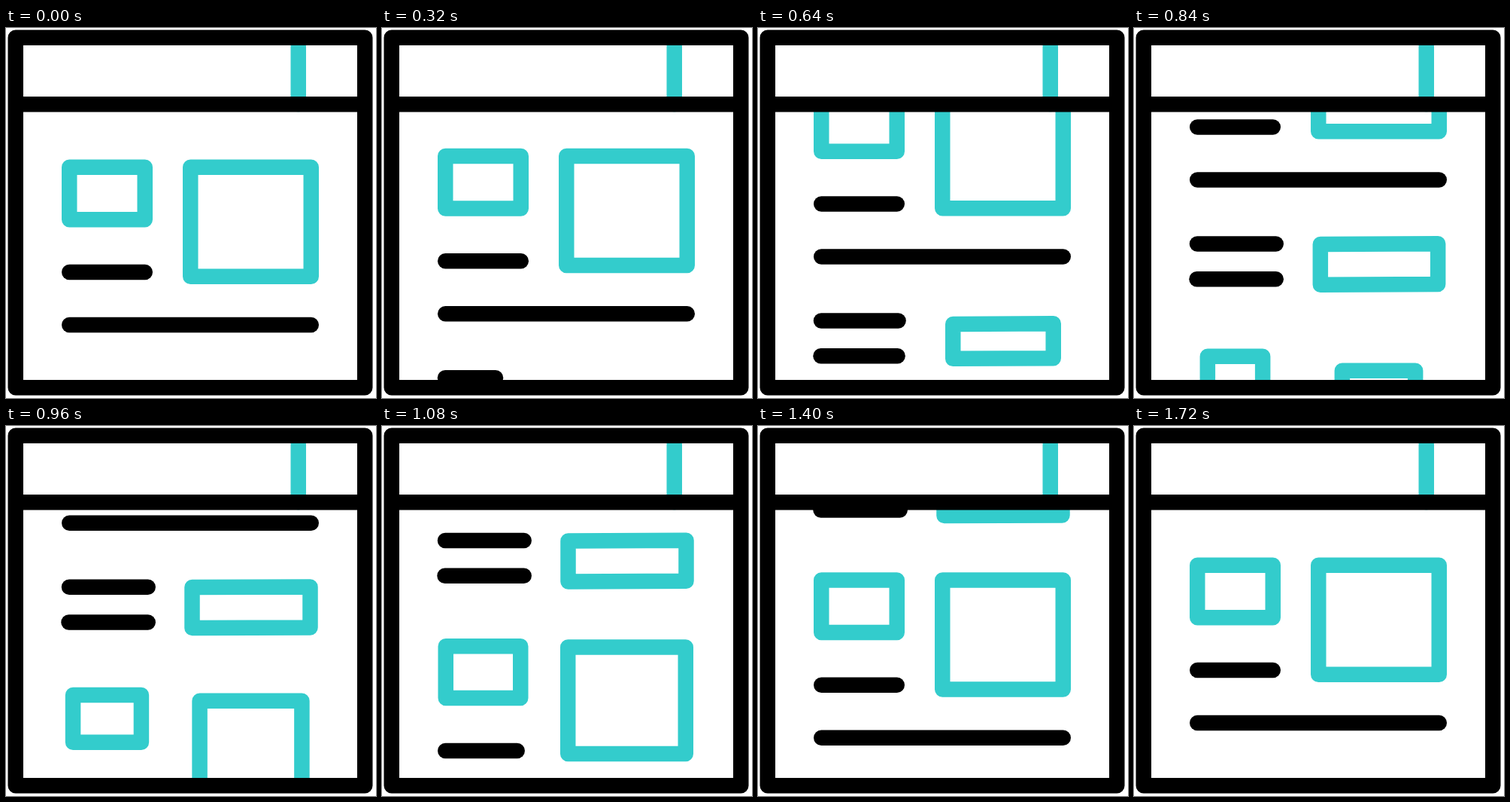
Write an HTML page that moves like this. It is 492x491 px and loops after 2 s.

```html
<!DOCTYPE html>
<html lang="en">
<head>
<meta charset="utf-8">
<title>Scrolling page icon</title>
<style>
  html, body { margin: 0; width: 100%; height: 100%; overflow: hidden; background: #fff; }
  svg { display: block; width: 492px; height: 491px; }
  path { fill: none; stroke: #000; stroke-width: 20.5; stroke-linecap: round; stroke-linejoin: round; }
  .teal { stroke: #3cc; }
</style>
</head>
<body>
<svg viewBox="0 0 492 491">
  <clipPath id="view"><rect x="13" y="101" width="464" height="376"/></clipPath>
  <path class="teal" d="M388.75 24V101"/>
  <g clip-path="url(#view)"><g id="page"></g></g>
  <path d="M12.75 12.75H477.25V477.25H12.75ZM12.75 101.25H477.25"/>
</svg>
<script>
const LOOP = 2000, STEP = 40, START = 40, END = 1720, DISTANCE = 434;
const page = document.getElementById('page');
const parts = [];

function addPath(teal, grow, shape) {
  const el = document.createElementNS('http://www.w3.org/2000/svg', 'path');
  if (teal) el.setAttribute('class', 'teal');
  page.append(el);
  parts.push({ el, grow, shape });
}

// Lines grow from their left end, boxes from their centre.
function line(x1, x2, y, grow) {
  addPath(false, grow, k => `M${x1} ${y}H${x1 + (x2 - x1) * k}`);
}

function box(cx, cy, w, h, grow, tilt = 0) {
  addPath(true, grow, k => {
    const l = cx - w * k / 2, r = cx + w * k / 2;
    const t = cy - h * k / 2, b = cy + h * k / 2;
    return `M${l} ${t + tilt}L${r} ${t - tilt}L${r} ${b - tilt}L${l} ${b + tilt}Z`;
  });
}

// grow = [start, duration] in ms; without it the part is always full size.
function mainBlock(y, grow = []) {
  box(134.5, 219.5 + y, 100.5, 69.5, grow[0]);
  box(325.5, 257.25 + y, 160.5, 145, grow[1]);
  line(84.25, 184.75, 324 + y, grow[2]);
  line(84.25, 405.75, 394 + y, grow[3]);
}

mainBlock(0);
line(84, 188.7, 479, [40, 700]);
line(83.5, 188.7, 525.7, [60, 700]);
box(326, 506, 157, 54, [260, 620], 0.3);
mainBlock(DISTANCE, [[566, 571], [650, 510], [637, 571], [720, 571]]);

const clamp = v => Math.min(1, Math.max(0, v));
const easeOut = u => 1 - (1 - u) ** 2;

// Same as cubic-bezier(.58, 0, .42, 1).
function easeInOut(u) {
  if (u <= 0 || u >= 1) return clamp(u);
  let lo = 0, hi = 1, s = 0.5;
  for (let i = 0; i < 30; i++) {
    s = (lo + hi) / 2;
    const x = 3 * (1 - s) ** 2 * s * 0.58 + 3 * (1 - s) * s * s * 0.42 + s ** 3;
    if (x < u) lo = s; else hi = s;
  }
  return s * s * (3 - 2 * s);
}

function draw(ms) {
  const t = Math.floor(ms / STEP) * STEP;
  const scroll = DISTANCE * easeInOut(clamp((t - START) / (END - START)));
  page.setAttribute('transform', `translate(0 ${-scroll})`);
  for (const { el, grow, shape } of parts) {
    const k = grow ? easeOut(clamp((t - grow[0]) / grow[1])) : 1;
    el.setAttribute('d', shape(k));
  }
}

function tick() {
  draw(performance.now() % LOOP);
  requestAnimationFrame(tick);
}
tick();
</script>
</body>
</html>
```
